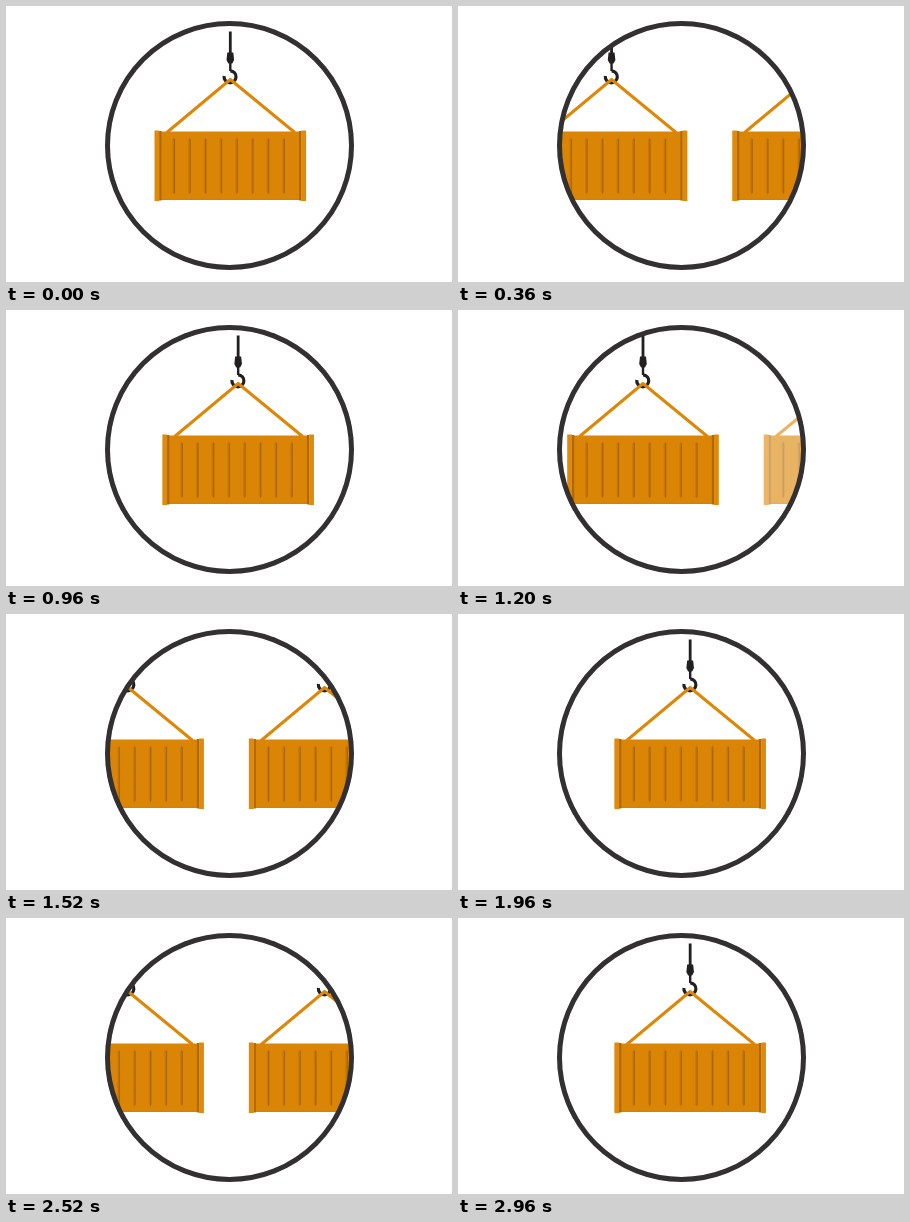
Recreate the animation shown at these times as an HTML page. Size 446 px wide and 276 px high, loop 3000 ms.

```html
<!DOCTYPE html>
<html lang="en">
<head>
<meta charset="utf-8">
<title>Container on a crane hook</title>
<style>
  html, body { margin: 0; width: 100%; height: 100%; overflow: hidden; background: #fff; }
  svg { display: block; }
</style>
</head>
<body>
<svg width="446" height="276" viewBox="0 0 446 276">
  <defs>
    <clipPath id="porthole"><circle cx="223.5" cy="139.5" r="121"/></clipPath>
    <!-- The load hangs from x = 0 -->
    <g id="load">
      <g fill="none" stroke="#231f20">
        <path d="M0 25.5V48" stroke-width="2.8"/>
        <path d="M0 56V65" stroke-width="2.4"/>
        <path d="M0 64.8A6 6 0 1 1 -6.2 70" stroke-width="3.2"/>
      </g>
      <path d="M-3 46.5H3L3.8 54L2 57.5H-2L-3.8 54Z" fill="#231f20"/>
      <path d="M-63.5 126.5L0 73.5L64.5 126.5" fill="none" stroke="#de8706" stroke-width="3" stroke-linejoin="round"/>
      <rect x="-71" y="125.5" width="142" height="68.3" fill="#da8506"/>
      <path d="M-70 193.4H70" stroke="#c87807" stroke-width=".8"/>
      <g id="ribs"></g>
      <path d="M-70 125V194.5M70 125V194.5" stroke="#ae6809" stroke-width="2.4"/>
      <path d="M-75.8 124.5h4.8v70.5h-4.8zM71 124.5h4.8v70.5h-4.8z" fill="#e08a0a"/>
    </g>
  </defs>
  <g clip-path="url(#porthole)">
    <use href="#load" class="load"/>
    <use href="#load" class="load"/>
  </g>
  <circle cx="223.5" cy="139.5" r="122" fill="none" stroke="#323031" stroke-width="5"/>
</svg>
<script>
  const CENTER = 224.3, GAP = 196.5, PERIOD = 1000, STEP = 40, FADE = 0.32;
  const loads = document.querySelectorAll('.load');
  const clamp = v => Math.max(0, Math.min(1, v));

  document.getElementById('ribs').innerHTML = Array.from({ length: 8 }, (_, i) => {
    const x = -56 + i * 15.7;
    return `<path d="M${x - 1.2} 133V187" stroke="#c87907" stroke-width="1.2"/>
            <path d="M${x - .6} 131.5L${x + .8} 133.5V186.5L${x - .6} 188.5Z" fill="#a9660a"/>`;
  }).join('');

  function place(load, x, opacity) {
    load.setAttribute('transform', `translate(${x} 0)`);
    load.setAttribute('opacity', opacity);
  }

  function draw(now) {
    const p = Math.floor((now + 4) / STEP) * STEP % PERIOD / PERIOD;
    const x = CENTER - GAP * p;
    place(loads[0], x, clamp((0.96 - p) / FADE));
    place(loads[1], x + GAP, clamp(p / FADE));
    // Near the end of the pass the arriving load is the only one left
    requestAnimationFrame(draw);
  }
  requestAnimationFrame(draw);
</script>
</body>
</html>
```
